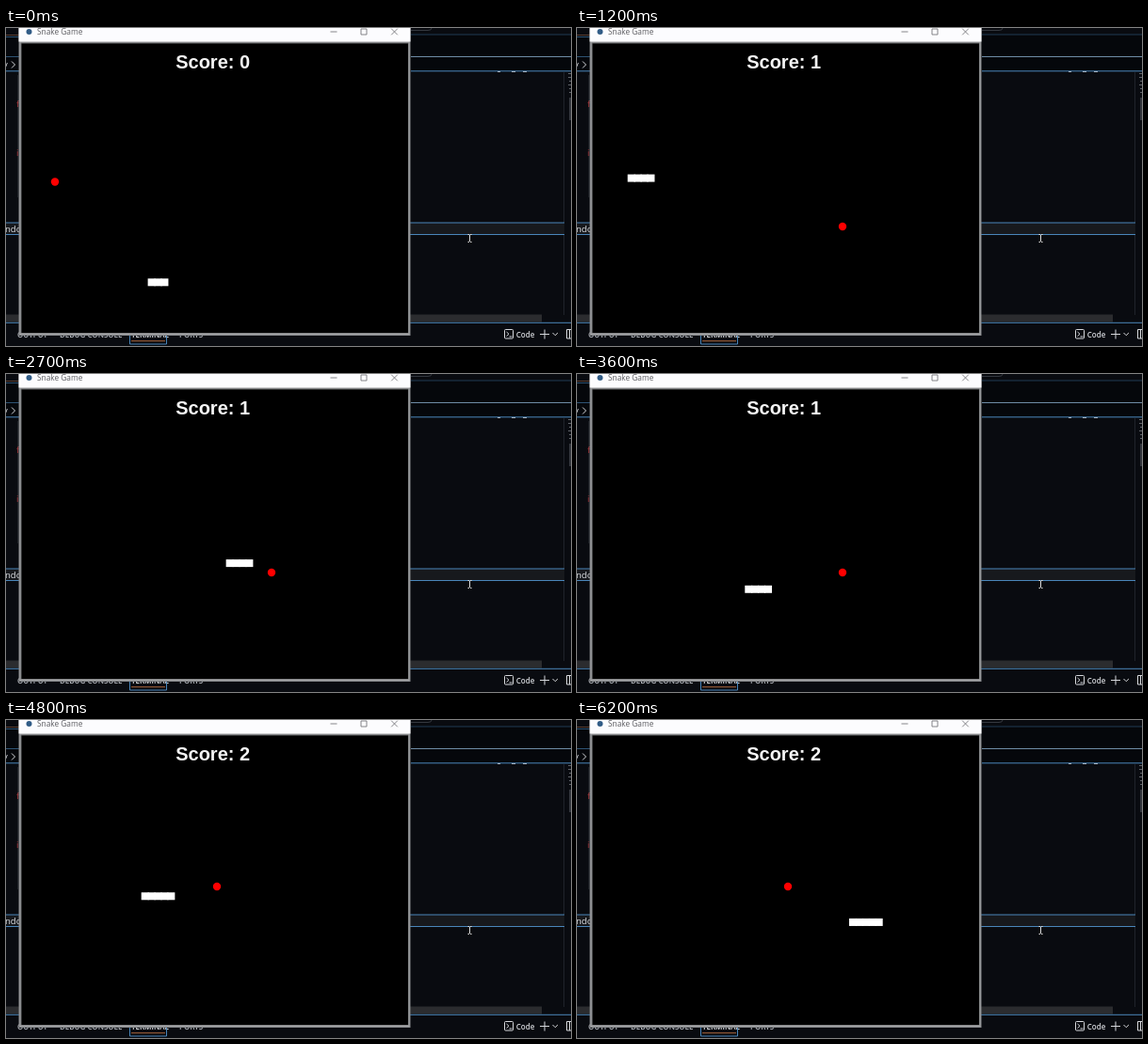
An HTML page that plays this animation: 600 px wide and 338 px high, repeating every 6300 ms.

```html
<!DOCTYPE html>
<html lang="en">
<head>
<meta charset="utf-8">
<title>Snake Game</title>
<style>
  html, body { margin: 0; width: 100%; height: 100%; overflow: hidden; background: #090b10; }
  svg { display: block; width: 600px; height: 338px; }
  .ui { font-family: "Open Sans", "Noto Sans", sans-serif; }
  .line { fill: none; stroke: #4a86bb; stroke-width: 1; }
  .icon { fill: none; stroke: #d6d8dc; stroke-width: 1; }
  .score { font: bold 20px "Liberation Sans", Arial, sans-serif; fill: #f4f4f4; }
</style>
</head>
<body>
<svg viewBox="0 0 600 338">
  <!-- editor behind the game -->
  <rect width="600" height="338" fill="#090b10"/>
  <rect y="7" width="600" height="39" fill="#05070b"/>
  <path class="line" d="M430 7H600" stroke-opacity=".4"/>
  <path d="M0 7.5H14" stroke="#5c4034"/>
  <path class="line" d="M0 9.5H14M0 30.5H14" stroke-opacity=".6"/>
  <path class="line" d="M430 30.5H600" style="stroke:#6f8ca6"/>
  <path class="line" d="M0 45.8H14M430 45.8H600"/>
  <path d="M430 2.5H448Q452 2.5 452 0" fill="none" stroke="#34383f"/>
  <path d="M522 46.5h3M537 46.5h4M549 46.5h4" stroke="#a9b4c0"/>
  <path d="M12.5 50V180" stroke="#1d2026"/>
  <path d="M592.5 47V305" stroke="#20242b"/>
  <path d="M597 48.5h3M597 52.5h3M598 56.5h2M597 60.5h3M598 64.5h2M598 68.5h2M599 74v24" stroke="#5d6168"/>
  <rect y="207" width="593" height="12.5" fill="#17191d"/>
  <path class="line" d="M0 207H593M0 219.5H593"/>
  <rect y="304.5" width="569" height="8" fill="#2b2c2f"/>
  <path class="line" d="M0 313.3H600"/>
  <g class="ui" font-size="9.5" fill="#e2e4e8">
    <text x="-3" y="42">y</text>
    <text x="-1" y="216.5">ndo</text>
    <g fill="#a8383c"><text x="11" y="84">f</text><text x="11" y="136">i</text></g>
  </g>
  <path class="icon" d="M6 35.5l3.5 3.5-3.5 3.5"/>
  <g class="ui" font-size="8" font-weight="600" fill="#b4b7bd">
    <text x="12" y="328.9">OUTPUT</text>
    <text x="57" y="328.9">DEBUG CONSOLE</text>
    <text x="133" y="328.9" fill="#eceef1">TERMINAL</text>
    <text x="184" y="328.9">PORTS</text>
  </g>
  <path class="line" d="M131.5 326V336H170.5V326"/>
  <path d="M133 332.7H169" stroke="#a9653d"/>
  <g class="icon">
    <rect x="529.5" y="320.5" width="9" height="9.5" rx="1"/>
    <path d="M531.5 323l2.5 2.3-2.5 2.3M534.5 328h3"/>
    <path d="M567 325.5H577M572 320.5V330.5M580.5 324l2.7 2.7 2.7-2.7"/>
    <path d="M601 320.5H595.5V330H601M598.5 321V330"/>
  </g>
  <text class="ui" x="541.8" y="328.8" font-size="8" font-weight="600" fill="#d6d8dc">Code</text>
  <path d="M490.5 219.5H492M493 219.5H494.5M492.5 220V227M490.5 227.5H492M493 227.5H494.5" stroke="#dcdcdc" fill="none"/>

  <!-- game window -->
  <rect x="13.5" y="0" width="416" height="327" fill="#85878a"/>
  <rect x="14.5" y="14" width="414" height="312" fill="#a3a4a6"/>
  <rect x="13.5" y="0" width="416" height="14.5" fill="#fcfcfe"/>
  <rect x="15.5" y="15.5" width="412" height="309" fill="#6b6c6e"/>
  <rect x="16.5" y="16.5" width="410.5" height="307.5" fill="#000"/>
  <circle cx="24.5" cy="4" r="3" fill="#315c86"/>
  <text class="ui" x="33" y="6.7" font-size="8.3" fill="#5c5c60">Snake Game</text>
  <path d="M344.5 4H351.5M377 1H383V7H377ZM409.2 .7L415.8 7.3M415.8 .7L409.2 7.3" fill="none" stroke="#76777b" stroke-width=".9"/>
  <text class="score" id="score" x="180.2" y="43"></text>
  <circle id="food" r="4.2" fill="#f00"/>
  <g id="snake" fill="#fff"></g>
</svg>
<script>
const LOOP = 6300, TICK = 100, CELL = 6.92, SEG = 8;
const START = { x: 154.6, y: 270.3 };
const ROUTE = 'L15 U16 R35 D6 L10 D1 L12 D3 R20 U6 L22 U3 R16 D7 R12';
const DIRS = { L: [-1, 0], R: [1, 0], U: [0, -1], D: [0, 1] };
const FOODS = [[52, 163.5], [282, 211], [224, 177]];
const MEALS = [11, 41]; // ticks at which food is eaten
const TAIL = 2;         // cells behind the head at the start

const scoreEl = document.getElementById('score');
const foodEl = document.getElementById('food');
const snakeEl = document.getElementById('snake');

const trail = [];
for (let i = TAIL; i >= 0; i--) trail.push([i, 0]);
for (const leg of ROUTE.split(' ')) {
  const [dx, dy] = DIRS[leg[0]];
  for (let n = +leg.slice(1); n > 0; n--) {
    const [x, y] = trail[trail.length - 1];
    trail.push([x + dx, y + dy]);
  }
}

const segs = Array.from({ length: 5 }, () => {
  const r = document.createElementNS('http://www.w3.org/2000/svg', 'rect');
  r.setAttribute('width', SEG);
  r.setAttribute('height', SEG);
  return snakeEl.appendChild(r);
});

// Three cells per tick, with two slightly late ticks.
const stepsAt = tick => 3 * tick - (tick >= 6) - (tick > 55);

function draw(tick) {
  const score = MEALS.filter(m => tick >= m).length;
  const head = TAIL + stepsAt(tick);
  scoreEl.textContent = 'Score: ' + score;
  foodEl.setAttribute('cx', FOODS[score][0]);
  foodEl.setAttribute('cy', FOODS[score][1]);
  segs.forEach((seg, i) => {
    const shown = i < 3 + score;
    seg.style.display = shown ? '' : 'none';
    if (!shown) return;
    const [x, y] = trail[head - i];
    seg.setAttribute('x', START.x + x * CELL - SEG / 2);
    seg.setAttribute('y', START.y + y * CELL - SEG / 2);
  });
}

let last = -1;
function loop() {
  const tick = Math.floor(performance.now() % LOOP / TICK);
  if (tick !== last) draw(last = tick);
  requestAnimationFrame(loop);
}
loop();
</script>
</body>
</html>
```
